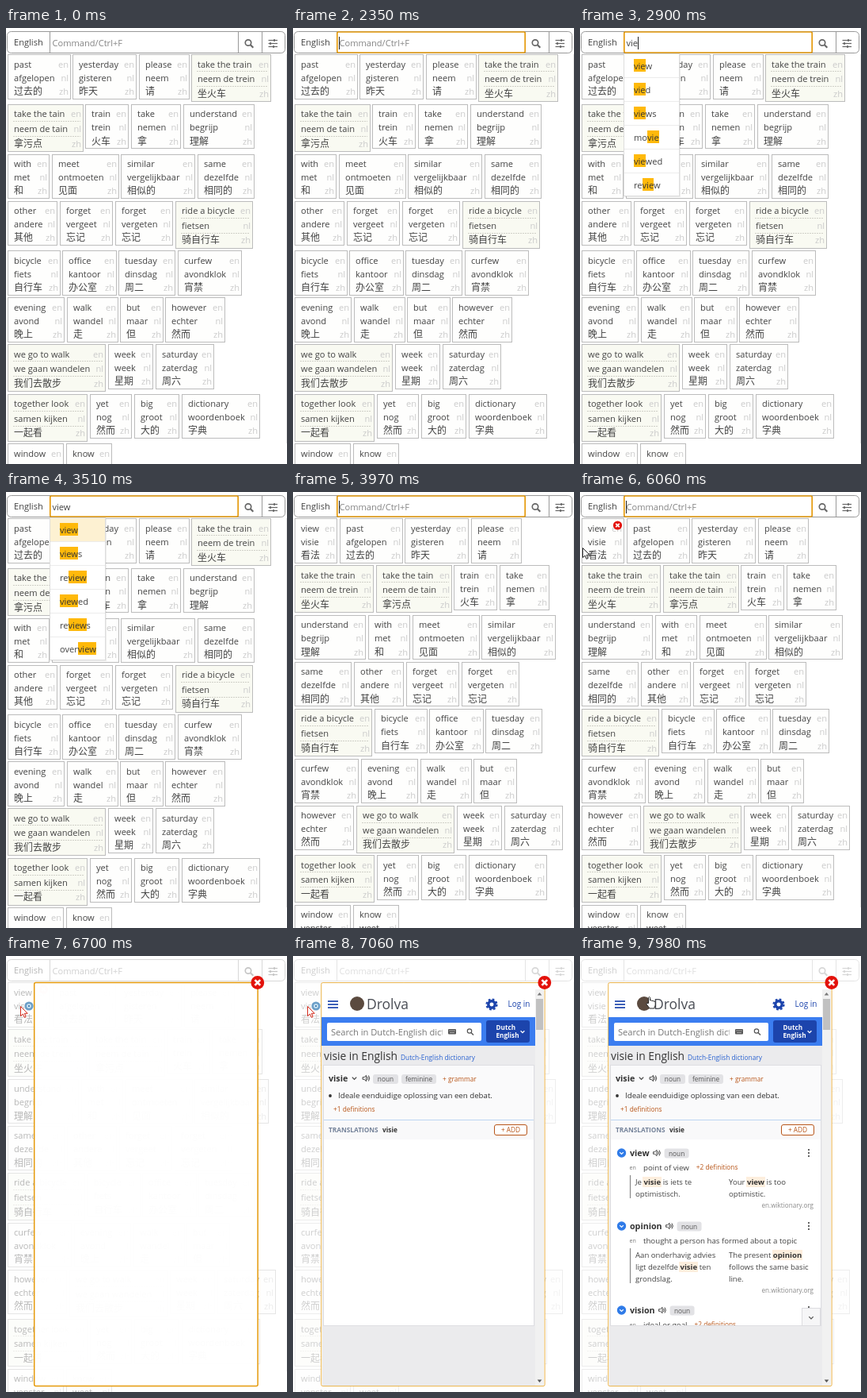
Recreate the animation shown at these times as an HTML page. Size 355 by 549 pixels, loop 8 s.

```html
<!DOCTYPE html>
<html lang="en">
<head>
<meta charset="utf-8">
<title>Word cards</title>
<style>
  html, body { margin: 0; width: 100%; height: 100%; overflow: hidden; background: #fff; }
  svg { display: block; }
  text { font-family: "Open Sans", "Noto Sans", sans-serif; white-space: pre; }
  .zh { font-family: "Noto Sans CJK SC", "Noto Sans CJK", sans-serif; }
</style>
</head>
<body>
<svg id="stage" width="355" height="549" viewBox="0 0 355 549"></svg>
<script>
const LOOP = 8000;
const SIZE = 11.1;
const INK = '#444';
const ORANGE = '#e59a0c';
const NAVY = '#1c44ac';
const RUST = '#b8561a';
const GAP = 2.6;

const stage = document.getElementById('stage');
const meter = document.createElement('canvas').getContext('2d');

// English | Dutch | Chinese | distance to the next card
const words = `past|afgelopen|过去的|82.5
yesterday|gisteren|昨天|83.5
please|neem|请|66.5
take the train|neem de trein|坐火车|103
take the tain|neem de tain|拿污点|98.5
train|trein|火车|57.6
take|nemen|拿|66
understand|begrijp|理解|93
with|met|和|56
meet|ontmoeten|见面|87.5
similar|vergelijkbaar|相似的|96.7
same|dezelfde|相同的|75
other|andere|其他|66.2
forget|vergeet|忘记|70
forget|vergeten|忘记|76
ride a bicycle|fietsen|骑自行车|101
bicycle|fiets|自行车|69.3
office|kantoor|办公室|71
tuesday|dinsdag|周二|74.5
curfew|avondklok|宵禁|84
evening|avond|晚上|75
walk|wandel|走|67.5
but|maar|但|57
however|echter|然而|78
we go to walk|we gaan wandelen|我们去散步|126.7
week|week|星期|60
saturday|zaterdag|周六|77.5
together look|samen kijken|一起看|104
yet|nog|然而|56
big|groot|大的|60
dictionary|woordenboek|字典|102
window|venster|窗口|74
know|weet|知道|61`.split('\n').map(line => line.split('|'));
const added = ['view', 'visie', '看法', 57];

const menus = [
  'via very over even view give',
  'via view vice visa video civil',
  'view vied views movie viewed review',
  'view views review viewed reviews overview'
].map(list => list.split(' '));
const keyTimes = [2580, 2730, 2900, 3050];

const rect = (x, y, w, h, fill, more = '') =>
  `<rect x="${x}" y="${y}" width="${w}" height="${h}" fill="${fill}" ${more}/>`;
const path = (d, stroke, width = 1, more = '') =>
  `<path d="${d}" fill="none" stroke="${stroke}" stroke-width="${width}" ${more}/>`;
const disc = (x, y, r, fill) => `<circle cx="${x}" cy="${y}" r="${r}" fill="${fill}"/>`;
const text = (x, y, s, size = SIZE, fill = INK, more = '') =>
  `<text x="${x}" y="${Math.round(y)}" font-size="${size}" fill="${fill}" ${more}>${s}</text>`;
const bold = 'font-weight="700"';
const atEnd = 'text-anchor="end"';
const centred = 'text-anchor="middle"';
const group = (id, body, more = '') => `<g id="${id}" ${more}>${body}</g>`;

function widthOf(s, size = SIZE, weight = 400) {
  meter.font = `${weight} ${size}px "Open Sans", "Noto Sans", sans-serif`;
  return meter.measureText(s).width;
}

// Parts between asterisks get a coloured backing, snapped to whole pixels.
function marked(x, y, s, size, back, weight, pad, h) {
  let out = '';
  s.split('*').forEach((part, i) => {
    if (!part) return;
    const w = widthOf(part, size, i % 2 ? weight : 400);
    const left = Math.round(x - pad), right = Math.round(x + w + pad);
    if (i % 2) out += rect(left, Math.round(y - h * 0.79), right - left, h, back);
    out += text(x, y, part, size, i % 2 ? '#333' : INK, i % 2 ? `font-weight="${weight}"` : '');
    x += w;
  });
  return out;
}

function card(x, y, step, [en, nl, zh]) {
  const phrase = en.includes(' ');
  const lines = phrase ? [16.3, 35, 53.6] : [16.3, 33.4, 50.6];
  const left = Math.round(x), top = Math.round(y);
  const right = Math.round(x + step - GAP);
  const bottom = Math.round(y + (phrase ? 60 : 56.4));
  let out = rect(left + 0.5, top + 0.5, right - left - 1, bottom - top - 1,
    phrase ? '#f9faf2' : '#fefefd', 'stroke="#bcbcbc"');
  if (phrase) {
    for (const dy of [21.5, 40.5])
      out += path(`M${left + 7} ${top + dy}H${right - 4}`, '#d0d0c8', 1, 'stroke-dasharray="2 1"');
  }
  [en, nl, zh].forEach((s, i) => {
    const cjk = i === 2;
    out += text(left + 8, y + lines[i], s, cjk ? 12 : SIZE, INK, cjk ? 'class="zh" lang="zh-CN"' : '');
    out += text(right - 3, y + lines[i], ['en', 'nl', 'zh'][i], SIZE, '#cbcbcb', atEnd);
  });
  return out;
}

function cardList(list) {
  const margin = 1.8;
  let x = margin, y = 33.4, tall = false, out = '';
  for (const word of list) {
    const step = +word[3];
    if (x + step > 355) {
      x = margin;
      y += tall ? 62.6 : 59;
      tall = false;
    }
    tall = tall || word[0].includes(' ');
    out += card(x, y, step, word);
    x += step;
  }
  return out;
}

function closeIcon(x, y, r) {
  const a = r * 0.4;
  return disc(x, y, r, '#e3120b') +
    path(`M${x - a} ${y - a}l${2 * a} ${2 * a}m0 ${-2 * a}l${-2 * a} ${2 * a}`, '#fff', r * 0.32);
}

function toolbar() {
  let out = rect(1.5, 4.5, 351, 27, '#fff', 'rx="5" stroke="#999"') +
    path('M55.5 5V31M293.5 5V31M323.5 5V31', '#999') +
    text(10, 22, 'English') +
    '<circle cx="306" cy="18.5" r="3.7" fill="none" stroke="#666" stroke-width="1.7"/>' +
    path('M308.8 21.3L312.3 24.8', '#666', 2.1);
  [[15.5, 339], [19.5, 334], [23.5, 338]].forEach(([y, knob]) => {
    out += path(`M331.5 ${y}H343`, '#666', 1.2) + rect(knob - 1, y - 1.3, 2, 2.6, '#666');
  });
  return out;
}

function menu(items, key, last) {
  let out = rect(56, 34, 71, 179, '#000', 'opacity=".07"') +
    rect(55.5, 32.5, 70, 179, '#fff', 'stroke="#ddd"');
  if (last) out += rect(56, 33, 69, 29.5, '#fdf1d2');
  items.forEach((word, i) => {
    const y = Math.round(52 + 29.9 * i);
    if (i) out += path(`M56 ${Math.round(33 + 29.9 * i) - 0.5}H125`, '#ececec');
    out += marked(68, y, word.replace(key, `*${key}*`), SIZE, '#ffb90a', 400, 0, 16);
  });
  return out;
}

const chevron = (x, y, r, color, w = 1.3) =>
  path(`M${x - r} ${y - r / 2}l${r} ${r} ${r} ${-r}`, color, w);
const speaker = (x, y) =>
  path(`M${x - 4} ${y - 1.3}h2l2.5-2.4v7.4l-2.5-2.4h-2zM${x + 2} ${y - 2}q1.6 2 0 4M${x + 3.4} ${y - 3.5}q2.8 3.5 0 7`, '#444');
const pill = (x, y, w, s) =>
  rect(x, y - 6, w, 12, '#e2e2e5', 'rx="3"') + text(x + w / 2, y + 3, s, 8.3, '#555', centred);

function siteHead() {
  let out = rect(37, 42, 269, 35, '#fff');
  for (const y of [57, 61, 65]) out += path(`M44 ${y}H57`, NAVY, 1.7);
  out += disc(81, 60, 9, '#5b4a3f') + text(93, 67, 'Drolva', 17.5, '#4a4d55');
  out += `<circle cx="251" cy="61" r="4.2" fill="none" stroke="${NAVY}" stroke-width="3.4"/>`;
  out += `<circle cx="251" cy="61" r="6.5" fill="none" stroke="${NAVY}" stroke-width="2.2" stroke-dasharray="2.7 2.4"/>`;
  out += text(271.5, 64, 'Log in', 10, NAVY);
  out += rect(36, 77, 270, 36, '#3b7df0') + rect(43, 84, 195, 23, '#fff', 'rx="2"');
  out += `<g clip-path="url(#field)">${text(48, 100, 'Search in Dutch-English dictionary', SIZE, '#777')}</g>`;
  out += rect(196, 92, 10, 6.5, '#555', 'rx="1"') + path('M197.5 94H204.5M198.5 96.5H203.5', '#fff', 1, 'stroke-dasharray="1 1"');
  out += '<circle cx="223" cy="94.5" r="2.7" fill="none" stroke="#555" stroke-width="1.2"/>' + path('M225 96.5l3 3', '#555', 1.4);
  out += rect(244, 81, 55, 28, NAVY, 'rx="3"');
  out += text(256.5, 93, 'Dutch', 8.2, '#fff', bold) + text(256.5, 103, 'English', 8.2, '#fff', bold);
  out += chevron(290, 95.5, 2.4, '#fff');
  return out;
}

function definition() {
  return text(39, 131, 'visie in English', 13.8, '#333') +
    text(136, 131, 'Dutch-English dictionary', 8.3, '#2a62d0') +
    rect(38.5, 137.5, 266, 328, '#fff', 'stroke="#dedee2"') +
    rect(39, 138, 265, 68, '#fafafb') + path('M39 206.5H304', '#bcd6f2') +
    text(45, 158, 'visie', 10.7, '#333', bold) + chevron(77.5, 154, 2.7, '#444') +
    speaker(92, 154) + pill(101, 155, 32, 'noun') + pill(137, 155, 44, 'feminine') +
    text(189, 158, '+ grammar', 8.3, RUST) + disc(47, 176, 1.9, '#333') +
    text(57, 179, 'Ideale eenduidige oplossing van een debat.', 9.7, '#333') +
    text(51, 196, '+1 definitions', 8.3, RUST) +
    rect(39, 207, 265, 24, '#f9f9fa') +
    text(45, 222, 'TRANSLATIONS', 8.3, '#75839a', bold) + text(113, 222, 'visie', 8.3, '#333', bold) +
    rect(254.5, 212.5, 41, 13, '#fff', `rx="2.5" stroke="${RUST}"`) + text(275, 222, '+ ADD', 8.3, RUST, centred);
}

function entry(y, word, gloss, more, left, right) {
  const end = 63 + widthOf(word, 10.7, 700);
  let out = disc(52.5, y, 5.7, '#2f7be8') + chevron(52.5, y + 0.3, 2.3, '#fff') +
    text(63, y + 4, word, 10.7, '#333', bold) + speaker(end + 9, y) + pill(end + 19, y + 0.5, 31, 'noun') +
    text(62.5, y + 21, 'en', 7, '#777') + text(80, y + 22, gloss, 9.7, INK);
  for (const dy of [-4, 0, 4]) out += disc(289, y + dy, 1, '#333');
  if (more) out += text(80 + widthOf(gloss, 9.7) + 9, y + 21, '+2 definitions', 8.3, RUST);
  left.forEach((s, i) => out += marked(70, y + 40 + 15 * i, s, 9.6, '#fdeedd', 700, 1, 13));
  right.forEach((s, i) => out += marked(188, y + 40 + 15 * i, s, 9.6, '#fdeedd', 700, 1, 13));
  if (left.length) {
    const foot = y + 27 + 15 * left.length;
    out += path(`M63.5 ${y + 28}V${foot}`, '#888', 1.2);
    out += text(295, foot + 12, 'en.wiktionary.org', 8.15, '#8a8a8a', atEnd);
  }
  return out;
}

function translations() {
  return '<g clip-path="url(#sheet)">' +
    entry(248, 'view', 'point of view', true,
      ['Je *visie* is iets te', 'optimistisch.'], ['Your *view* is too', 'optimistic.']) +
    entry(340, 'opinion', 'thought a person has formed about a topic', false,
      ['Aan onderhavig advies', 'ligt dezelfde *visie* ten', 'grondslag.'],
      ['The present *opinion*', 'follows the same basic', 'line.']) +
    entry(446, 'vision', 'ideal or goal', true, [], []) + '</g>' +
    rect(280.5, 443.5, 23, 22, '#f6f6f7', 'stroke="#dcdce0"') + chevron(292, 455.5, 2.7, '#555');
}

const scrollbar = () => rect(306, 42, 11, 499, '#f1f1f1') + rect(307, 54, 9, 39, '#c1c1c1') +
  '<path d="M308.7 49.5l2.8-3.5 2.8 3.5z" fill="#777"/><path d="M308.7 533.5l2.8 3.5 2.8-3.5z" fill="#555"/>';

const cursorArt =
  '<path id="arrow" d="M.5 .5V12.6L3.4 10 5.2 14.3 7.2 13.4 5.4 9.3H9.2Z" fill="#fff" stroke-width="1"/>' +
  group('busy', '<circle cx="11" cy="0" r="4.2" fill="#d8ecf8" stroke="#6c9fc8" stroke-width="2.8"/>' + disc(11, 0, 1.3, '#4c86b4')) +
  group('hand', '<path d="M3.5 9V1.8Q4.5 0 5.6 1.8V5.5Q7 4.4 7.8 6 9.2 5 10 6.6 11.8 5.8 12.2 7.6V11.5L10.7 15.5H5L1 10.2Q.8 8 3.5 9Z" fill="#fff" stroke="#222"/>');

stage.innerHTML =
  '<defs><clipPath id="field"><rect x="44" y="84" width="144.5" height="23"/></clipPath>' +
  '<clipPath id="sheet"><rect x="39" y="232" width="265" height="233"/></clipPath></defs>' +
  rect(0, 0, 355, 549, '#fff') + path('M354.5 33V523', '#e6e6e6') + toolbar() +
  group('before', cardList(words)) + group('after', cardList([added, ...words])) +
  group('hint', text(58.5, 23, 'Command/Ctrl+F', SIZE, '#858585')) +
  group('ring', rect(55.8, 5, 237.4, 26, 'none', `rx="1.5" stroke="${ORANGE}" stroke-width="1.7"`)) +
  `<text id="typed" x="58.5" y="23" font-size="${SIZE}" fill="${INK}"></text>` +
  '<rect id="caret" y="11" width="1" height="16" fill="#222"/>' +
  menus.map((items, i) => group('menu' + i, menu(items, 'view'.slice(0, i + 1), i === 3))).join('') +
  group('remove', closeIcon(47.5, 42, 5.6)) +
  '<rect id="veil" width="355" height="549" fill="#fff"/>' +
  group('popup',
    `<rect id="frame" x="35.7" y="33.6" width="282.4" height="508" rx="2" fill="#fff" stroke="${ORANGE}"/>` +
    group('site', rect(37, 42, 269, 499, '#ebebed') + siteHead() + definition() + scrollbar()) +
    group('results', translations()) + closeIcon(317.8, 33.5, 8.4)) +
  group('cursor', cursorArt);

const part = {};
stage.querySelectorAll('[id]').forEach(node => part[node.id] = node);
const show = (id, on) => part[id].style.display = on ? '' : 'none';
const within = (t, a, b) => t >= a && t < b;

function pointerAt(t) {
  if (t >= 7980) return [83, 50.5];
  if (t >= 7905) return [62, 57];
  if (t >= 7830) return [36, 62];
  if (t >= 6290) return [18, 63];
  if (t >= 6220) return [13, 63];
  const step = Math.floor((t - 5370) / 76.6);
  if (step >= 10) return [7, 65];
  const p = step / 9, k = 1 - (1 - p) ** 1.7, q = 1 - k;
  return [308 * q * q + 2 * 90 * k * q + 3 * k * k, 519 * q * q + 2 * 210 * k * q + 70 * k * k];
}

function render(t) {
  const focus = within(t, 1320, 6520);
  const keys = t < 3970 ? keyTimes.filter(k => t >= k).length : 0;
  const value = 'view'.slice(0, keys);
  const blinkOff = [[1850, 2350], [3510, 3970], [4520, 5070], [5570, 6060]].some(([a, b]) => within(t, a, b));

  show('before', t < 3970);
  show('after', t >= 3970);
  show('hint', !keys);
  show('ring', focus);
  show('caret', focus && !blinkOff);
  part.typed.textContent = value;
  part.caret.setAttribute('x', keys ? Math.round(58.5 + widthOf(value)) : 58);
  menus.forEach((_, i) => show('menu' + i, keys === i + 1));
  show('remove', t >= 6060);

  const settled = t >= 6750;
  show('veil', t >= 6700);
  show('popup', t >= 6700);
  part.veil.setAttribute('opacity', settled ? 0.74 : 0.62);
  part.frame.setAttribute('fill-opacity', settled ? 1 : 0.97);
  part.frame.setAttribute('stroke-width', settled ? 1 : 1.5);
  part.frame.setAttribute('stroke-opacity', settled ? 0.75 : 1);
  show('site', t >= 7060);
  show('results', t >= 7140);

  show('cursor', t >= 5370);
  show('arrow', t < 7980);
  show('hand', t >= 7980);
  show('busy', within(t, 6290, 7830));
  part.arrow.setAttribute('stroke', within(t, 6520, 7830) ? '#d42a1c' : '#222');
  part.cursor.setAttribute('transform', `translate(${pointerAt(Math.max(t, 5370))})`);
}

const start = performance.now();
function tick() {
  render((performance.now() - start) % LOOP);
  requestAnimationFrame(tick);
}
tick();
</script>
</body>
</html>
```
